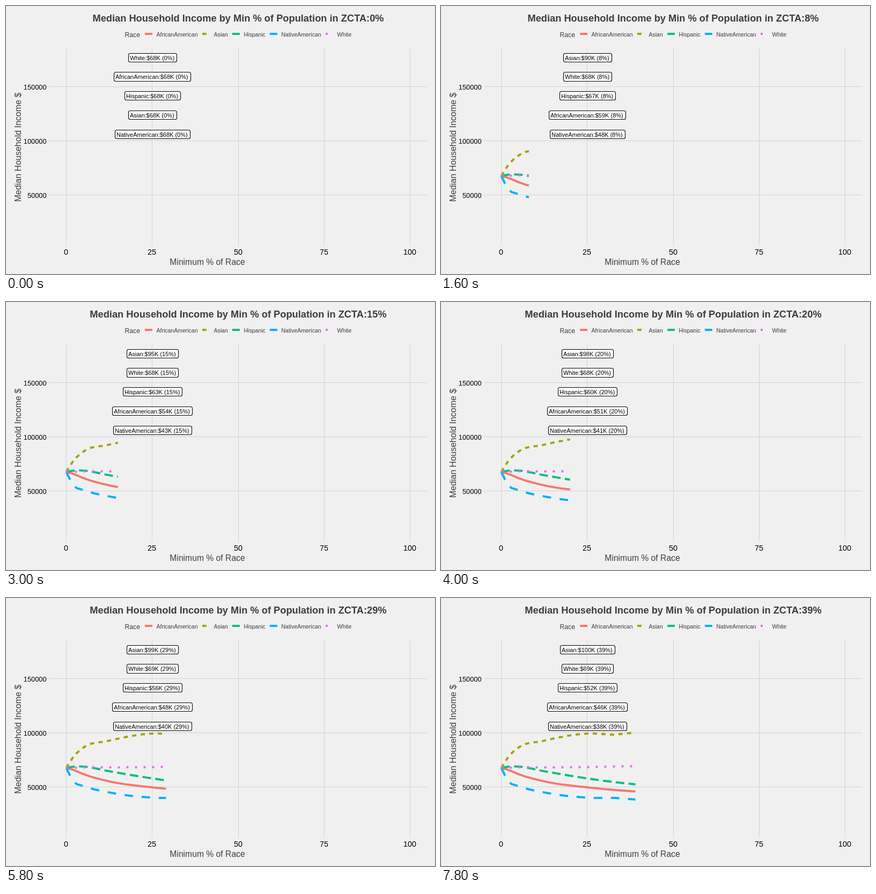
These frames come from a looping animation (800x500 px, 8000 ms). An HTML page with a canvas:

```html
<!DOCTYPE html>
<html lang="en">
<head>
<meta charset="utf-8">
<title>Median Household Income</title>
<style>
  html, body { margin: 0; width: 100%; height: 100%; overflow: hidden; background: #f0f0f0; }
  canvas { display: block; }
</style>
</head>
<body>
<canvas id="chart" width="800" height="500"></canvas>
<script>
const ctx = document.getElementById('chart').getContext('2d');
const STEP_MS = 200, STEPS = 40, INK = '#3c3c3c';

// Each income curve (in $K) runs smoothly through one key point per stop.
const stops = [0, 2, 5, 12, 26, 33, 39];
const series = [
  { name: 'AfricanAmerican', color: '#f8766d', dash: [], income: [67.8, 65.8, 61.8, 55.5, 49.3, 47.2, 45.8] },
  { name: 'Asian', color: '#a3a500', dash: [8, 8], income: [67.6, 77.6, 86.4, 92.4, 99.4, 98.4, 100.3] },
  { name: 'Hispanic', color: '#00bf7d', dash: [16, 8], income: [67.7, 68.7, 68.8, 64.8, 57.4, 54.4, 52.4] },
  { name: 'NativeAmerican', color: '#00b0f6', dash: [16, 16], income: [67.55, 55.4, 50.9, 45.25, 40, 39.8, 38.4] },
  { name: 'White', color: '#e76bf3', dash: [4, 12], income: [67.9, 67.7, 68.1, 68.1, 68.4, 68.9, 69.2] }
];

const xAt = percent => 112.5 + 6.412 * percent;
const yAt = thousands => 453.5 - 2.02 * thousands;

// Cubic Hermite interpolation; tangents blend the slopes on both sides.
function incomeAt(income, percent) {
  const last = stops.length - 1;
  const gap = i => stops[i + 1] - stops[i];
  const slope = i => (income[i + 1] - income[i]) / gap(i);
  const tangent = i => i === 0 ? slope(0) : i === last ? slope(last - 1)
    : (gap(i) * slope(i - 1) + gap(i - 1) * slope(i)) / (gap(i - 1) + gap(i));
  const i = Math.max(0, stops.findIndex(s => s >= percent) - 1);
  const h = gap(i), t = (percent - stops[i]) / h, u = 1 - t;
  return u * u * (1 + 2 * t) * income[i] + t * t * (1 + 2 * u) * income[i + 1]
    + h * t * u * (u * tangent(i) - t * tangent(i + 1));
}

function setFont(size, weight = '') {
  ctx.font = `${weight} ${size}px "Liberation Sans", Arial, sans-serif`;
}

function text(str, x, y, size, align = 'left', color = INK, weight = '') {
  setFont(size, weight);
  ctx.textAlign = align;
  ctx.fillStyle = color;
  ctx.fillText(str, x, y);
}

function line(points, color, width, dash = []) {
  ctx.strokeStyle = color;
  ctx.lineWidth = width;
  ctx.setLineDash(dash);
  ctx.beginPath();
  points.forEach(([x, y]) => ctx.lineTo(x, y));
  ctx.stroke();
  ctx.setLineDash([]);
}

function drawAxes() {
  for (let k = 50; k <= 150; k += 50) {
    const y = yAt(k);
    line([[80, y], [785, y]], '#d2d2d2', 1);
    text(k + '000', 75.5, y + 5, 12.8, 'right', '#000');
  }
  for (let p = 0; p <= 100; p += 25) {
    const x = Math.floor(xAt(p));
    line([[x + 0.5, 79], [x + 0.5, 447]], '#d2d2d2', 1);
    text(p, x, 464, 14.4, 'center', '#000');
  }
  text('Minimum % of Race', 375.5, 483, 15.7, 'center');
  ctx.save();
  ctx.translate(28, 263.5);
  ctx.rotate(-Math.PI / 2);
  text('Median Household Income $', 0, 0, 16, 'center');
  ctx.restore();
}

function drawLegend() {
  text('Race', 221.5, 58, 12.2);
  let x = 259;
  for (const { name, color, dash } of series) {
    line([[x, 52], [x + 14, 52]], color, 4, dash);
    text(name, x + 21.5, 57, 10.5);
    x = Math.round(x + 29.5 + ctx.measureText(name).width);
  }
}

function drawLabel(name, value, percent, row) {
  const str = `${name}:$${Math.round(value)}K (${percent}%)`;
  setFont(11);
  const width = Math.round(ctx.measureText(str).width) + 8;
  const x = Math.round(273 - width / 2);
  const top = 88 + 35.75 * row, y = Math.floor(top);
  ctx.beginPath();
  ctx.roundRect(x + 0.5, y + 0.5, width - 1, Math.floor(top + 16.3) - y, 3);
  ctx.fillStyle = '#fff';
  ctx.fill();
  ctx.strokeStyle = '#000';
  ctx.lineWidth = 1.1;
  ctx.stroke();
  text(str, x + 3, y + 13, 11, 'left', '#000');
}

function draw(percent) {
  ctx.fillStyle = '#f0f0f0';
  ctx.fillRect(0, 0, 800, 500);
  drawAxes();
  drawLegend();
  text(`Median Household Income by Min % of Population in ZCTA:${percent}%`, 433, 29, 18.25, 'center', INK, 'bold');

  for (const { income, color, dash } of series) {
    const points = Array.from({ length: percent + 1 }, (_, p) => [xAt(p), yAt(incomeAt(income, p))]);
    line(points, color, 4, dash);
  }
  series.map(({ name, income }) => ({ name, value: incomeAt(income, percent) }))
    .sort((a, b) => b.value - a.value)
    .forEach(({ name, value }, row) => drawLabel(name, value, percent, row));
}

const start = performance.now();
function tick() {
  draw(Math.floor((performance.now() - start) / STEP_MS) % STEPS);
  requestAnimationFrame(tick);
}
tick();
</script>
</body>
</html>
```
